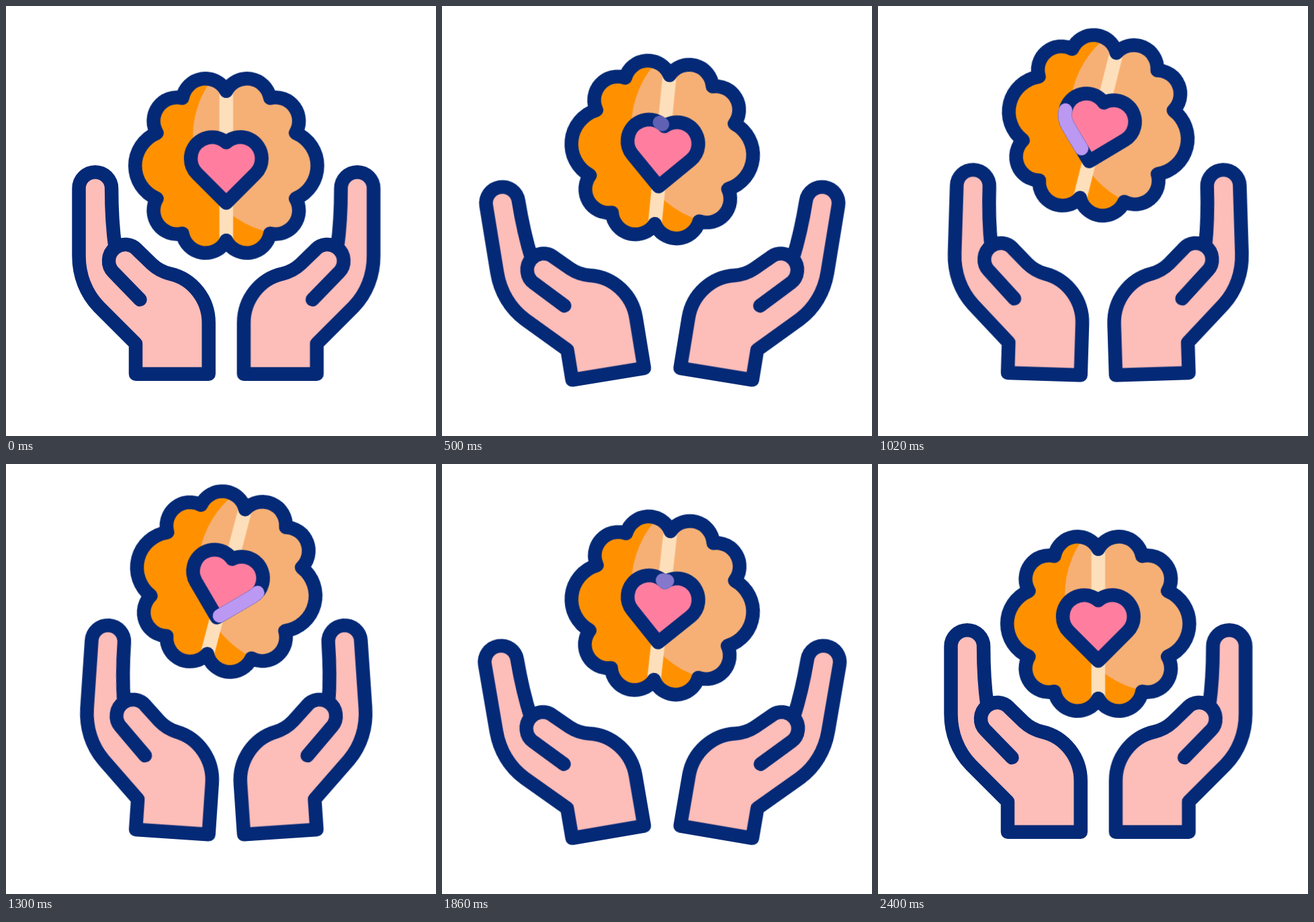
Write an HTML page without scripts that moves like this. It is 640 px wide and 640 px high and loops after 2420 ms.

```html
<!DOCTYPE html>
<html lang="en">
<head>
<meta charset="utf-8">
<title>Caring hands</title>
<style>
  html, body { margin: 0; height: 100%; overflow: hidden; background: #fff; }
  svg { display: block; width: 100vw; height: 100vh; }

  .line {
    stroke: #042976;
    stroke-width: 20.5;
    stroke-linecap: round;
    stroke-linejoin: round;
  }
  .brain, .hand, .glow {
    animation: 2420ms cubic-bezier(.333, 0, .667, 1) infinite;
  }
  .brain { animation-name: float; }
  .hand {
    transform-origin: 247.4px 547.7px;
    animation-name: sway;
  }
  .glow {
    fill: none;
    stroke: #bb98f2;
    animation-name: tail, length, fade;
    animation-timing-function: cubic-bezier(.333, 0, .667, 1), linear, linear;
  }

  @keyframes float {
    0%, 99.174%, 100% { transform: translate(327.8px, 237.8px) rotate(0deg); }
    49.587% { transform: translate(327.8px, 173.8px) rotate(15deg); }
  }
  @keyframes sway {
    0%, 99.174%, 100% { transform: rotate(0deg); }
    24.793%, 74.38% { transform: rotate(-10deg); }
    49.587% { transform: rotate(5deg); }
  }

  /* The tail trails the head by 200 ms; the dash length is the gap between them. */
  @keyframes tail {
    0%, 24.793% { stroke-dashoffset: 0; }
    82.645%, 100% { stroke-dashoffset: -1000; }
  }
  @keyframes length {
    0% { stroke-dasharray: 0 2000; }
    16.529% {
      stroke-dasharray: 0 2000;
      animation-timing-function: cubic-bezier(.333, 0, .667, .368);
    }
    24.793% {
      stroke-dasharray: 55.4 2000;
      animation-timing-function: cubic-bezier(.333, .667, .667, 1);
    }
    49.587% {
      stroke-dasharray: 212.8 2000;
      animation-timing-function: cubic-bezier(.333, 0, .667, .333);
    }
    74.38% {
      stroke-dasharray: 55.4 2000;
      animation-timing-function: cubic-bezier(.333, .632, .667, 1);
    }
    82.645%, 100% { stroke-dasharray: 0 2000; }
  }
  @keyframes fade {
    0%, 16.529%, 82.645%, 100% { opacity: 0; }
    24.793%, 74.38% { opacity: 1; }
  }
</style>
</head>
<body>
<svg viewBox="0 0 640 640">
  <defs>
    <path id="lobes" d="M0-111.3A35 35 0 0 0-65.3-100.8A35 35 0 0 0-103.3-48.8A53 53 0 0 0-103.3 48.8A35 35 0 0 0-65.3 100.8A35 35 0 0 0 0 111.3"/>
    <clipPath id="brain-shape">
      <use href="#lobes"/>
      <use href="#lobes" transform="scale(-1 1)"/>
    </clipPath>
    <path id="hand" class="line" fill="#fdbdb9" d="M193 547.7V502.5L138 447.5C119 428 108.5 401 108.5 372V271.5A24.3 24.3 0 0 1 157.1 271.5C157.1 300 158.2 328 162.6 360A24.3 24.3 0 0 1 194.7 362.3L217 384C225 391.5 234 396 244 398.5C278 406 301.7 437 301.7 471.5V547.7Z
      M199.5 437L160.3 396.7A24.3 24.3 0 0 1 162.6 360"/>
  </defs>

  <g><use href="#hand" class="hand"/></g>
  <g transform="translate(655.6) scale(-1 1)"><use href="#hand" class="hand"/></g>

  <g class="brain">
    <g clip-path="url(#brain-shape)">
      <rect x="-150" y="-150" width="300" height="300" fill="#ff9100"/>
      <circle cx="95.2" cy="-42.8" r="145" fill="#f6b075"/>
      <rect x="-10.25" y="-120" width="20.5" height="240" fill="#fedfbb"/>
    </g>
    <g class="line" fill="none">
      <use href="#lobes"/>
      <use href="#lobes" transform="scale(-1 1)"/>
    </g>
    <path class="line" fill="#ff7e9f" d="M-3.6-37.4A31.8 31.8 0 0 0-52.8-10.8A31.8 31.8 0 0 0-43.5 11.7L0 55.2L43.5 11.7A31.8 31.8 0 0 0 52.8-10.8A31.8 31.8 0 0 0 0-34.7A31.8 31.8 0 0 0-3.6-37.4Z"/>
    <path class="line glow" pathLength="1000" d="M-3.6-37.4A31.8 31.8 0 0 0-52.8-10.8A31.8 31.8 0 0 0-43.5 11.7L0 55.2L43.5 11.7A31.8 31.8 0 0 0 52.8-10.8A31.8 31.8 0 0 0 0-34.7A31.8 31.8 0 0 0-3.6-37.4"/>
  </g>
</svg>
</body>
</html>
```
